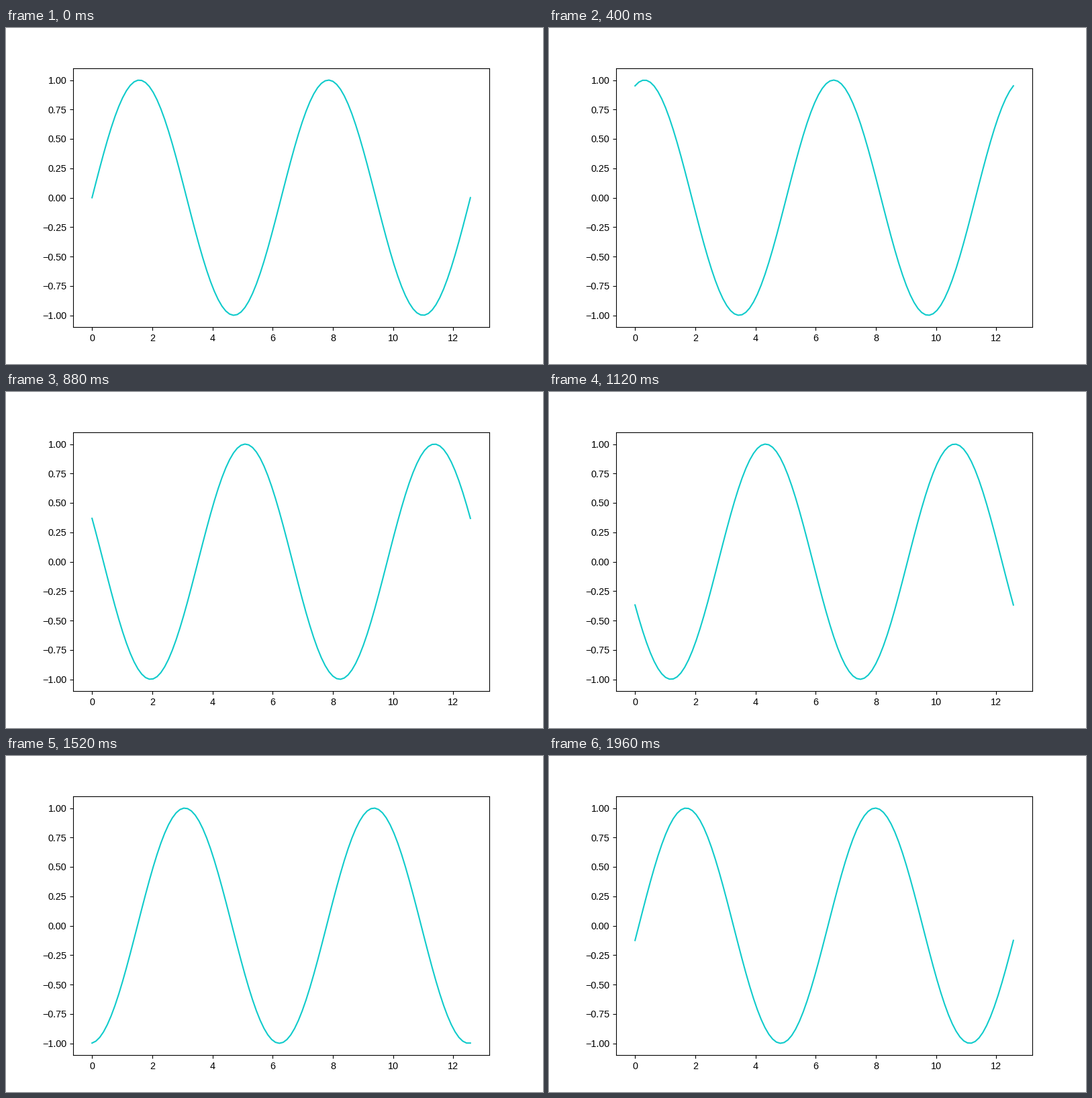
Animation of 800 by 500 pixels, one loop 2 s. Source, as a matplotlib script:

```python
import numpy as np
import matplotlib.pyplot as plt
from matplotlib.animation import FuncAnimation

FRAMES = 50
INTERVAL = 40

plt.rcParams["font.family"] = "Liberation Sans"
plt.rcParams["font.size"] = 10.4

x = np.linspace(0, 4 * np.pi, 100)

fig, ax = plt.subplots(figsize=(8, 5), dpi=100)
line, = ax.plot(x, np.sin(x), color="#10cbcb", lw=1.5)
ax.set_xlim(-0.2 * np.pi, 4.2 * np.pi)
ax.set_ylim(-1.1, 1.1)
ax.set_xticks(np.arange(0, 13, 2))
ax.set_yticks(np.arange(-1, 1.01, 0.25))


def update(frame):
    phase = 2 * np.pi * frame / FRAMES
    line.set_ydata(np.sin(x + phase))
    return line,


anim = FuncAnimation(fig, update, frames=FRAMES, interval=INTERVAL,
                     repeat=True, repeat_delay=0)
plt.show()
```
